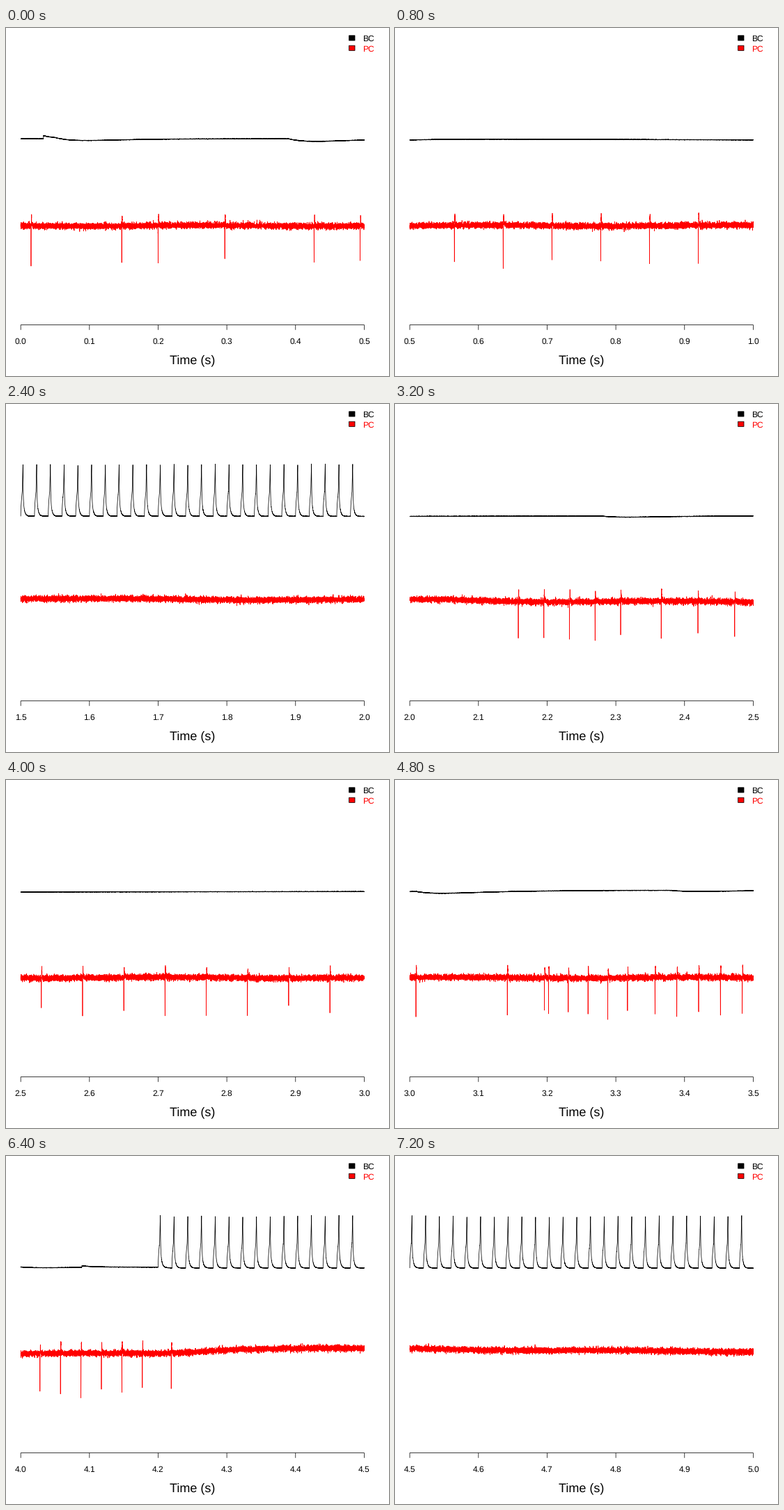
A matplotlib script that plays this animation: 550x500 px, repeating every 8000 ms.

```python
import numpy as np
import matplotlib.pyplot as plt
from matplotlib.animation import FuncAnimation
from matplotlib.patches import Rectangle

W, H, DPI = 550, 500, 100
PX = 72 / DPI                     # one pixel in points
THIN = 0.75 * PX
WINDOWS, SPAN, SAMPLES = 10, 0.5, 10000
LEFT, RIGHT, AXIS_Y = 21.17, 514.43, 426.56
SCALE = (RIGHT - LEFT) / SPAN     # pixels per second
FONT = "Liberation Sans"
RED = "#ff0000"

STIM = [(1.0, 2.0), (4.2, 5.2)]   # basket cell driven in these spans
PERIOD, PEAK = 0.02, 0.0032       # seconds

# Basket cell: resting level, quick bumps and slow dips as (s, pixels)
BC_REST = [(0, 159.2), (0.5, 159.2), (1, 160.8), (2, 161.4), (3, 160.3),
           (3.3, 158.6), (4, 158.3), (4.2, 159.6), (4.22, 160.8), (5, 161)]
BUMPS = [(0.033, 4.4), (4.089, 2.2)]
DIPS = [(0.05, 2.6), (0.39, 3.6), (2.28, 1.5), (3.01, 2.7), (3.38, 1.5),
        (3.69, 4.2), (3.99, 2)]

# Purkinje cell: evenly spaced runs of spikes as (first, last, count)
RUNS = [(0.015, 0.147, 2), (0.2, 0.297, 2), (0.427, 0.494, 2),
        (0.565, 0.92, 6),
        (2.158, 2.307, 5), (2.366, 2.473, 3), (2.53, 2.95, 8),
        (3.009, 3.009, 1), (3.142, 3.196, 2), (3.202, 3.317, 5),
        (3.357, 3.484, 5), (3.511, 3.763, 9), (3.847, 3.995, 6),
        (4.028, 4.177, 6), (4.219, 4.219, 1)]
pc_times = np.concatenate([np.linspace(*run) for run in RUNS])
spike_rng = np.random.default_rng(7)
pc_depths = spike_rng.normal(54, 5, len(pc_times))
pc_rises = spike_rng.uniform(9, 12, len(pc_times))


def alpha(x):
    """Rise to 1 at x = 1, then a slow fall."""
    x = np.maximum(x, 0)
    return x * np.exp(1 - x)


def driven_spike(s):
    ms, after = s * 1000, np.maximum(s - PEAK, 0) * 1000
    foot = 36 * np.minimum(ms / 2.2, 1) ** 0.6
    rise = foot + 39 * np.clip(ms - 2.2, 0, 1)
    fall = 45 * np.exp(-after / 0.35) + 30 * np.exp(-after / 1.8)
    return np.where(s < PEAK, rise, fall)


def bc_trace(t, rng):
    y = np.interp(t, *zip(*BC_REST)) + rng.normal(0, 0.2, SAMPLES)
    for t0, size in BUMPS:
        s = np.maximum(t - t0, 0)
        y -= np.where(t > t0, size * np.exp(-s / 0.02), 0)
    for t0, size in DIPS:
        y += size * alpha((t - t0) / 0.04)
    gains = rng.uniform(0.985, 1.01, 60)
    for start, stop in STIM:
        on = (t >= start - 1e-9) & (t < stop)
        s = t[on] - start + 1e-9
        y[on] -= gains[(s // PERIOD).astype(int)] * driven_spike(s % PERIOD)
    return y


def pc_trace(t, rng):
    y = 284 + 0.7 * np.sin(2 * np.pi * t / 0.35)
    for start, stop in STIM:
        y -= 4.8 * alpha((t - start) / 0.22) ** 1.5
        y -= 2.5 * np.interp(t, [start, start + 0.1, stop + 0.05, stop + 0.18],
                             [0, 1, 1, 0])
    y += rng.normal(0, 2.1, SAMPLES)
    for t0, depth, rise in zip(pc_times, pc_depths, pc_rises):
        if t[0] <= t0 <= t[-1]:
            d = (t - t0) * SCALE
            y += depth * np.exp(-(d / 0.14) ** 2)
            y -= rise * np.exp(-((d - 0.65) / 0.22) ** 2)
            y -= np.where(d > 0.4, 5 * np.exp(-np.abs(d - 0.4) / 1.1), 0)
    return y


plt.rcParams["text.hinting"] = "none"
plt.rcParams["path.simplify"] = False
fig = plt.figure(figsize=(W / DPI, H / DPI), dpi=DPI, facecolor="white")
ax = fig.add_axes([0, 0, 1, 1])
ax.set_xlim(0, W)
ax.set_ylim(H, 0)
ax.axis("off")


def line(x, y, color="black"):
    return ax.plot(x, y, color=color, lw=THIN, snap=False,
                   solid_capstyle="butt")[0]


def label(x, y, s, size=12, color="black", ha="center"):
    return ax.text(x, y, s, fontsize=size * PX, family=FONT, color=color,
                   ha=ha, va="baseline")


ticks = np.linspace(LEFT, RIGHT, 6)
line([LEFT, RIGHT], [AXIS_Y, AXIS_Y])
for x in ticks:
    line([x, x], [AXIS_Y, AXIS_Y + 7.2])
tick_labels = [label(x, 453.6, "") for x in ticks]
label((LEFT + RIGHT) / 2, 482.4, "Time (s)", 18)

for y, name, color in [(10.8, "BC", "black"), (25.2, "PC", RED)]:
    ax.add_patch(Rectangle((492.6, y), 8.4, 7.2, facecolor=color,
                           edgecolor="black", lw=THIN, snap=False))
    label(512, y + 8.2, name, color=color, ha="left")

u = np.linspace(0, 1, SAMPLES)
xs = LEFT + (RIGHT - LEFT) * u
bc_line, pc_line = line([], []), line([], [], RED)


def update(k):
    rng = np.random.default_rng(100 + k)
    t = SPAN * (k + u)
    bc_line.set_data(xs, bc_trace(t, rng))
    pc_line.set_data(xs, pc_trace(t, rng))
    for i, text in enumerate(tick_labels):
        text.set_text(f"{SPAN * k + 0.1 * i:.1f}")
    return [bc_line, pc_line, *tick_labels]


anim = FuncAnimation(fig, update, frames=WINDOWS, interval=800,
                     repeat=True, repeat_delay=0, blit=False)
plt.show()
```
